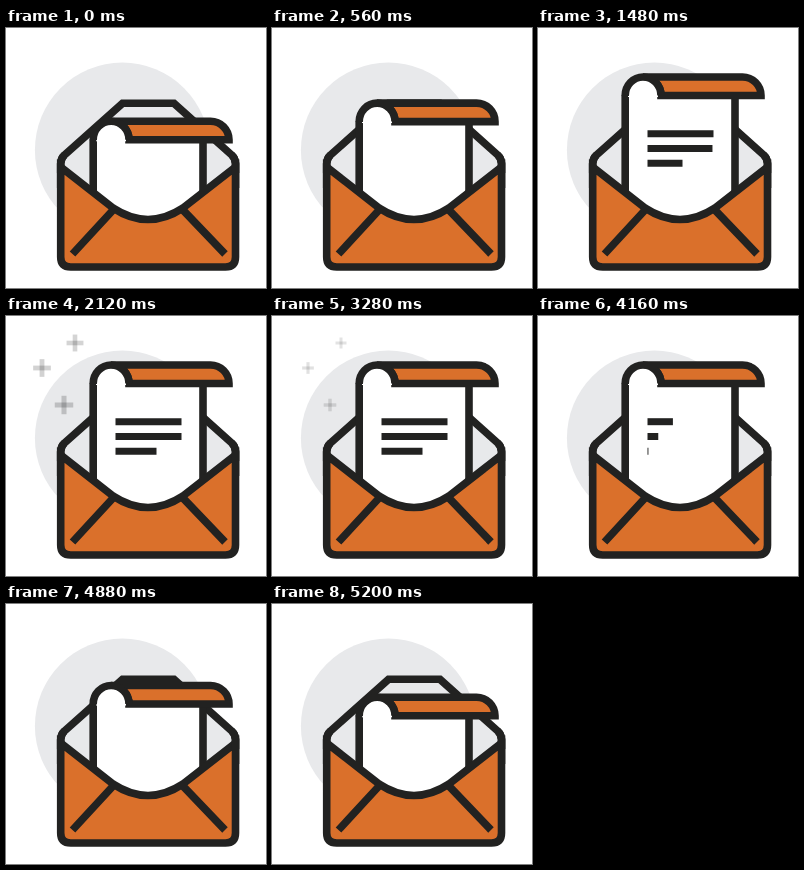
Write an HTML page that moves like this. It is 260 px wide and 260 px high and loops after 5.44 s.

```html
<!DOCTYPE html>
<html lang="en">
<head>
<meta charset="utf-8">
<title>Letter</title>
<style>
  html, body { margin: 0; height: 100%; overflow: hidden; background: #fff; }
  svg { display: block; width: 100vw; height: 100vh; }
  .ink { stroke: #222221; stroke-width: 7.6; }
  #lines { stroke-width: 7; }
</style>
</head>
<body>
<svg viewBox="0 0 260 260" fill="none">
  <circle cx="116.3" cy="122" r="87.4" fill="#e8e9eb"/>
  <g id="sparks" stroke="#000" stroke-width="6"></g>

  <path class="ink" fill="#e8e9eb" d="M54.7 160V135.500Q54.700 130.500 58.500 127L116.500 75.300H168L225.700 127Q229.500 130.500 229.500 135.500V160"/>

  <path id="sheet" class="ink" fill="#fff"/>
  <g id="roll" class="ink">
    <path fill="#da702b" d="M105 49H204.500A18.500 18.500 0 0 1 223 67.500H123A18 18.500 0 0 0 105 49Z"/>
    <path fill="#fff" stroke="none" d="M90 69V67.500A15 15.300 0 0 1 120 67.500V69Z"/>
    <path d="M87.200 68V67.500A17.900 18.500 0 0 1 123 67.500"/>
  </g>
  <g id="lines" class="ink"></g>

  <path class="ink" fill="#da702b" d="M54.700 139L107 180Q142 203 177 180L229.500 139V229Q229.500 239 219.500 239H64.700Q54.700 239 54.700 229Z"/>
  <path class="ink" d="M108 181L66.500 226M176 181L219 226M54.700 145V135.500Q54.700 130.500 58.500 127M229.500 145V135.500Q229.500 130.500 225.700 127"/>
</svg>
<script>
const LOOP = 5440, DROP = 44.3;
const $ = id => document.getElementById(id);
const ramp = (t, from, to) => Math.min(1, Math.max(0, (t - from) / (to - from)));
const smooth = u => u * u * (3 - 2 * u);

function addShape(parent, tag) {
  return $(parent).appendChild(document.createElementNS('http://www.w3.org/2000/svg', tag));
}

const lines = [66, 66, 41].map((length, i) => ({ length, y: 105.7 + 14.8 * i, path: addShape('lines', 'path') }));
const sparks = [[69, 27], [36, 52], [58, 89]].map(([x, y]) => {
  const group = addShape('sparks', 'g');
  group.innerHTML = '<path d="M-11 0H11"/><path d="M0 -11V11"/>';
  return { x, y, group };
});

function draw(t) {
  const rise = smooth(ramp(t, 40, 1010) ** 1.32) - smooth(ramp(t, 4220, 5220));
  const dy = DROP * (1 - rise);
  $('roll').setAttribute('transform', `translate(0 ${dy})`);
  $('sheet').setAttribute('d', `M87.200 ${67.5 + dy}V210H197V${67.5 + dy}`);

  lines.forEach(({ length, y, path }, i) => {
    const start = 760 + 110 * i, back = 3560 + 110 * (2 - i);
    const shown = smooth(ramp(t, start, start + 660)) - smooth(ramp(t, back, back + 660));
    path.setAttribute('d', shown > 0 ? `M109.500 ${y}h${length * shown}` : '');
  });

  const visible = t >= 1780 && t < 3360;
  sparks.forEach(({ x, y, group }, i) => {
    const lag = 40 * (1 - i);
    const grow = ramp(t, 1780 + lag, 2340 + lag) - ramp(t, 2850 - lag, 3310 - lag);
    const size = 0.5 + 0.5 * grow;
    group.setAttribute('transform', `translate(${x} ${y}) scale(${size})`);
    group.setAttribute('stroke-opacity', visible ? 0.22 * size : 0);
  });
}

function frame() {
  draw(performance.now() % LOOP);
  requestAnimationFrame(frame);
}
frame();
</script>
</body>
</html>
```
